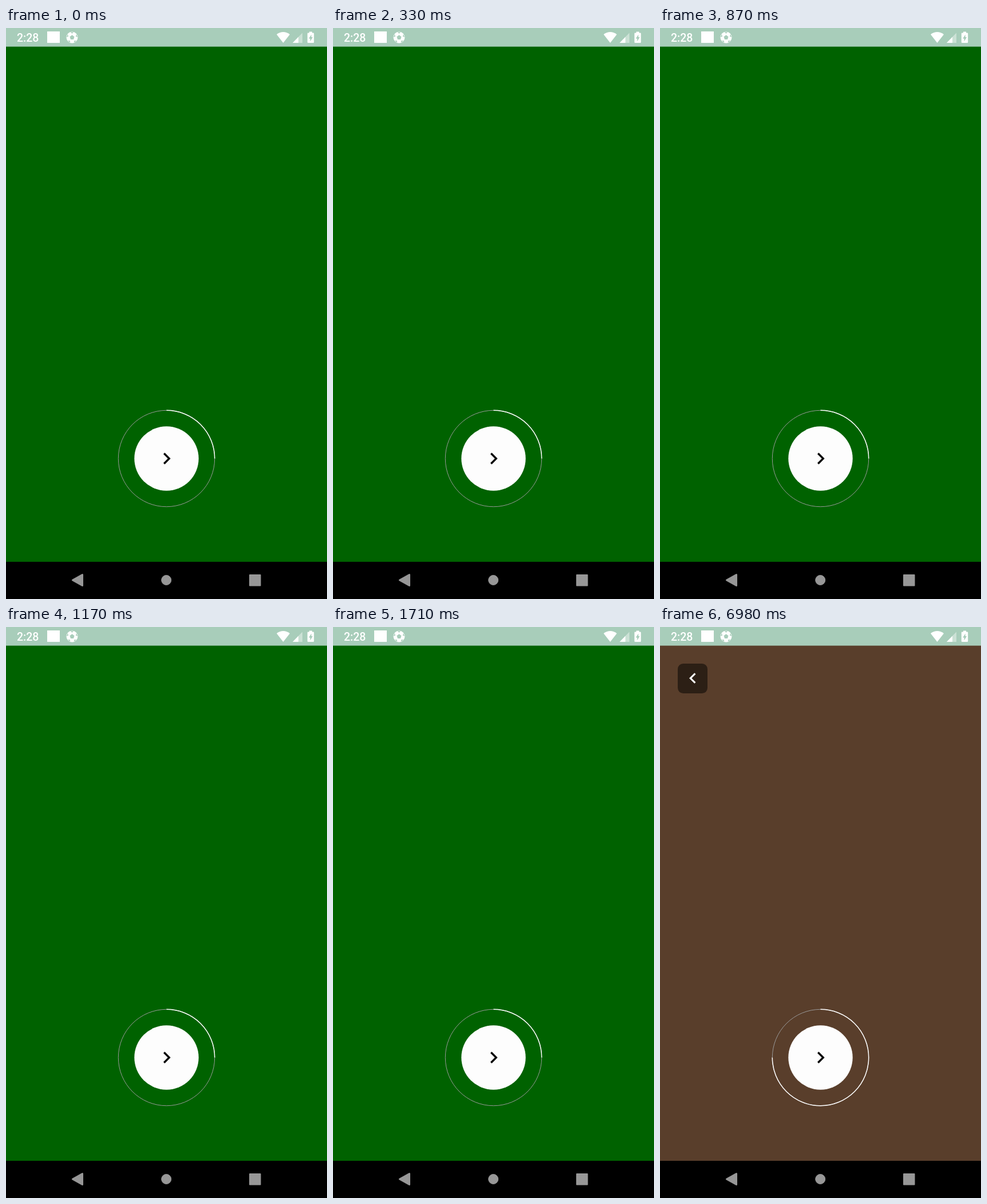
An HTML page that plays this animation: 561 px wide and 998 px high, repeating every 8000 ms.

```html
<!DOCTYPE html>
<html lang="en">
<head>
<meta charset="utf-8">
<style>
  html, body { margin: 0; width: 100%; height: 100%; overflow: hidden; background: #000; }
  svg { display: block; width: 100%; height: 100%; }
  text { font: 500 19.5px Roboto, sans-serif; }
</style>
</head>
<body>
<svg viewBox="0 0 561 998">
  <rect id="page" y="32" width="561" height="901" fill="#006200"/>
  <rect width="561" height="32.6" fill="#a8cdba"/>

  <g fill="#fff">
    <text x="19" y="24">2:28</text>
    <rect x="72" y="6" width="22" height="20"/>
    <!-- ball -->
    <circle cx="115.5" cy="16.5" r="10"/>
    <g fill="#a8cdba">
      <path id="patch" d="M115.5 12.3l4 2.9-1.5 4.7h-5l-1.5-4.7z"/>
      <g id="spots"></g>
    </g>
    <!-- wifi, signal, battery -->
    <path d="M473 11.2Q484.5 2.8 496 11.2L484.5 26z"/>
    <path d="M501 26L518 8.5V26z" opacity=".4"/>
    <path d="M501 26L511 15.7V26z"/>
    <path d="M530 6.5h5v2h2q1.2 0 1.2 1.2v15q0 1.300-1.200 1.300h-9q-1.200 0-1.200-1.300v-15q0-1.200 1.200-1.200h2z"/>
    <path d="M533.600 11.500v4.500h2.400l-4.400 7.500v-5h-2.400z" fill="#a8cdba"/>
  </g>

  <g id="back" visibility="hidden">
    <rect x="31" y="64" width="52" height="52" rx="9.500" opacity=".5"/>
    <path d="M15.410 7.410L14 6l-6 6 6 6 1.410-1.410L10.830 12z" fill="#fff" transform="translate(38.600 70.900) scale(1.550)"/>
  </g>

  <g fill="none" transform="translate(280.500 752.500)">
    <circle r="84.200" stroke="#999"/>
    <circle id="arc" r="84.200" stroke="#fff" stroke-width="1.500" pathLength="4" stroke-dasharray="1 4" transform="rotate(-90)"/>
    <circle r="56.200" fill="#fdfdfd"/>
    <path d="M10 6L8.590 7.410 13.170 12l-4.580 4.590L10 18l6-6z" fill="#000" transform="translate(-20.100 -20.400) scale(1.700)"/>
  </g>

  <g fill="#979797" stroke="#979797" stroke-linejoin="round">
    <path d="M116.500 965L133.500 955.500V974.500z" stroke-width="3"/>
    <circle cx="280.200" cy="965" r="8.500"/>
    <rect x="426" y="956" width="18.500" height="18.500" stroke-width="2"/>
  </g>
</svg>
<script>
const $ = id => document.getElementById(id);
const steps = [[0, '#006200'], [3910, '#702d35'], [6980, '#593e2b']];

for (let i = 0; i < 5; i++) {
  $('spots').innerHTML += `<path d="M112.800 7.300L118.200 7.300 115.500 9.800z" transform="rotate(${i * 72} 115.500 16.500)"/>`;
}

function draw(now) {
  const t = now % 8000;
  const step = steps.findLastIndex(s => t >= s[0]);
  $('page').setAttribute('fill', steps[step][1]);
  $('arc').setAttribute('stroke-dasharray', `${step + 1} 4`);
  $('back').setAttribute('visibility', step ? 'visible' : 'hidden');
}

const start = performance.now();
function tick() {
  draw(performance.now() - start);
  requestAnimationFrame(tick);
}
tick();
</script>
</body>
</html>
```
